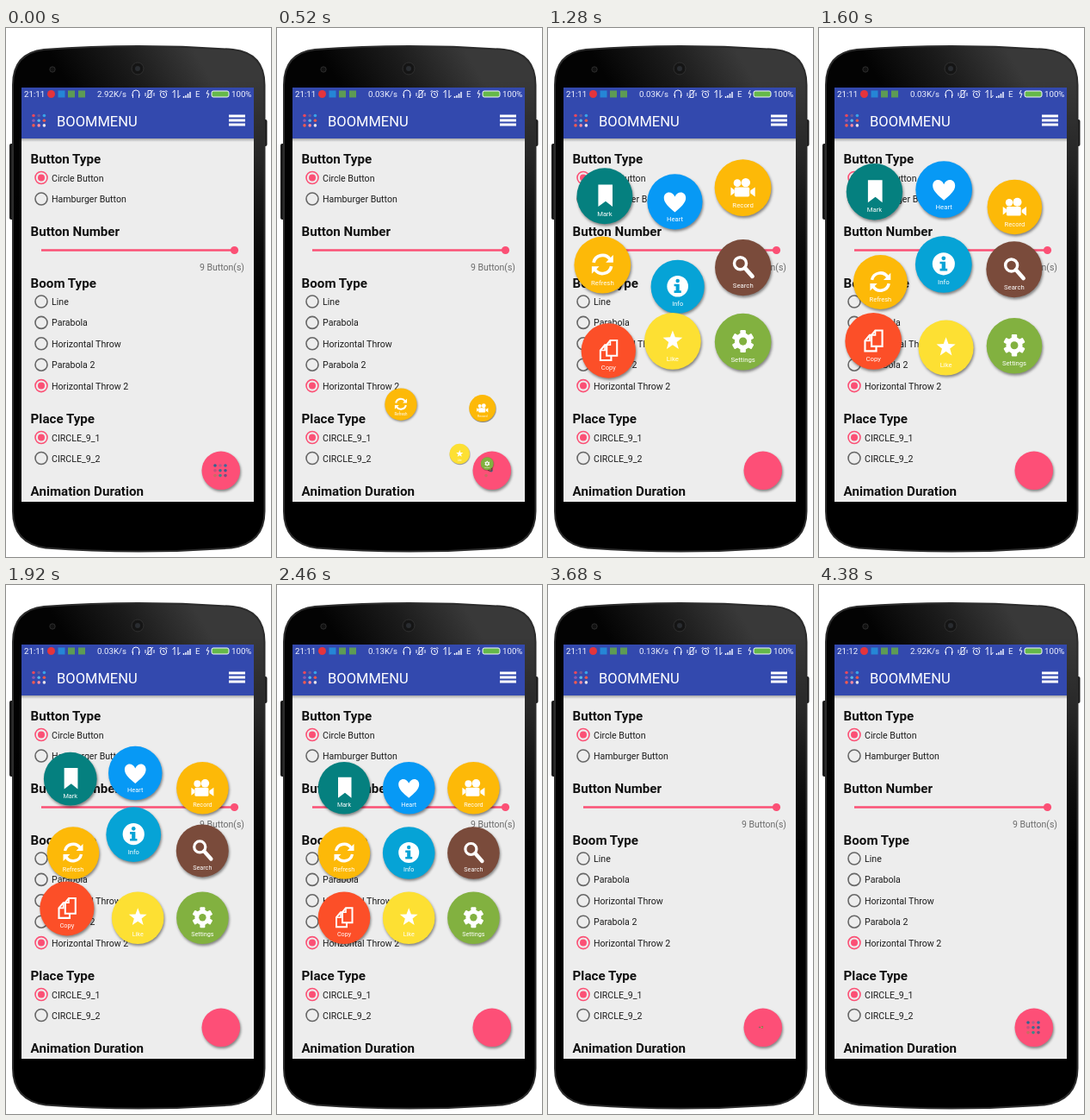
Animation, 308 px wide and 613 px high, one loop 4460 ms. Source, as an HTML page:

```html
<!DOCTYPE html>
<html lang="en">
<head>
<meta charset="utf-8">
<title>Boom menu</title>
<style>
  html, body { margin: 0; width: 100%; height: 100%; overflow: hidden; background: #fff; }
  svg { display: block; width: 308px; height: 613px; font-family: Roboto, sans-serif; }
  .head { font-size: 15.15px; font-weight: 700; fill: #111; }
  .item { font-size: 10.6px; fill: #1c1c1c; }
  .status { font-size: 9.7px; fill: #f2f4ff; }
  .label { font-size: 7.2px; fill: #fff; text-anchor: middle; }
  .raised { filter: drop-shadow(1px 2px 1.5px rgba(0, 0, 0, .45)); }
  .line { fill: none; stroke: #f2f4ff; stroke-width: 1; }
</style>
</head>
<body>
<svg viewBox="0 0 308 613">
  <defs>
    <linearGradient id="face" gradientUnits="userSpaceOnUse" x1="90" y1="95" x2="215" y2="20">
      <stop offset="0" stop-color="#030303"/><stop offset=".5" stop-color="#1b1b1b"/>
      <stop offset="1" stop-color="#393939"/>
    </linearGradient>
    <linearGradient id="fall" gradientUnits="userSpaceOnUse" x1="0" y1="60" x2="0" y2="330">
      <stop offset="0" stop-opacity="0"/><stop offset="1"/>
    </linearGradient>
    <linearGradient id="shade" x2="0" y2="1">
      <stop offset="0" stop-opacity=".3"/><stop offset="1" stop-opacity="0"/>
    </linearGradient>
    <path id="body" d="M8 66Q8 29 44 25Q154 17 264 25Q300.500 29 300.500 66V560Q300.500 597 262 602.500Q154 610.500 46 602.500Q8 597 8 560Z"/>
  </defs>

  <rect x="4" y="134" width="6" height="88" rx="2" fill="#1a1a1a"/>
  <rect x="298" y="106" width="5.500" height="31" rx="2" fill="#1a1a1a"/>
  <use href="#body" fill="url(#face)"/>
  <use href="#body" fill="url(#fall)" stroke="#2c2c2c" stroke-width="2"/>
  <circle cx="153" cy="47" r="7" fill="#151515" stroke="#303030"/>
  <circle cx="153" cy="47" r="3" fill="#292c30"/>
  <circle cx="54" cy="48" r="3.2" fill="#111" stroke="#3b3b3b" stroke-width=".7"/>

  <rect x="18" y="69" width="270" height="480" fill="#ededed"/>
  <rect x="18" y="128" width="270" height="4" fill="url(#shade)"/>
  <rect x="18" y="69" width="270" height="59" fill="#3349ae"/>

  <g class="status">
    <text id="clock" x="21" y="80"></text>
    <text id="speed" x="140" y="80" text-anchor="end"></text>
    <text x="220" y="80">E</text>
    <text x="262" y="80">100%</text>
  </g>
  <circle cx="52.500" cy="76.500" r="4.500" fill="#e5343c"/>
  <rect x="60.500" y="72.500" width="8" height="8" fill="#2586d6"/>
  <rect x="72" y="72.500" width="8" height="8" fill="#5d9b55"/>
  <rect x="84" y="72.500" width="8" height="8" fill="#5d9b55"/>
  <g class="line">
    <path d="M147 79v-3a4 4 0 0 1 8 0v3M147.500 77v4M154.500 77v4"/>
    <path d="M165 72.500h4v8h-4zM162 75v4M172 75v4M163 81l8-9"/>
    <circle cx="183" cy="77" r="3.700"/><path d="M183 75v2l1.500 1M178.500 74l2-2M187.500 74l-2-2"/>
    <path d="M196 81v-9l-2.500 3M200 72v9l2.500-3"/>
    <path d="M206.500 81v-2M209 81v-3M211.500 81v-5M214 81v-7" stroke-width="1.500"/>
    <path d="M235 72l-2 4h3l-2 5"/>
    <rect x="239" y="73" width="20" height="7" rx="2" fill="#65b84a"/>
  </g>

  <g id="logo"></g>
  <text x="59" y="114" font-size="16.500" fill="#fff">BOOMMENU</text>
  <path d="M259 102h19M259 107h19M259 112h19" stroke="#fff" stroke-width="3"/>

  <g id="form"></g>
  <path d="M41 257.500H265" stroke="#fb5075" stroke-width="2.500"/>
  <circle cx="265.500" cy="257.500" r="4.600" fill="#fb5075"/>
  <text x="277" y="281" font-size="10.500" fill="#6b6b6b" text-anchor="end">9 Button(s)</text>

  <circle class="raised" cx="249.800" cy="512.800" r="22.300" fill="#fd4f77"/>
  <g id="dots"></g>
  <g id="menu"></g>
</svg>
<script>
const LOOP = 4460, OPEN_TIME = 1450, CLOSE_TIME = 1400, STAGGER = 47.5;
const OPEN_AT = 304, CLOSE_AT = 2530;
const HOME = { x: 249.5, y: 512.5 };
const PINK = '#fb5075';
const byId = id => document.getElementById(id);

function add(parent, tag, attrs, content = '') {
  const node = document.createElementNS('http://www.w3.org/2000/svg', tag);
  for (const key in attrs) node.setAttribute(key, attrs[key]);
  node.innerHTML = content;
  return parent.appendChild(node);
}

function bezier(x1, y1, x2, y2) {
  const curve = (a, b, s) => 3 * (1 - s) ** 2 * s * a + 3 * (1 - s) * s * s * b + s ** 3;
  return u => {
    if (u <= 0) return 0;
    if (u >= 1) return 1;
    let low = 0, high = 1;
    for (let i = 0; i < 24; i++) {
      const mid = (low + high) / 2;
      if (curve(x1, x2, mid) < u) low = mid; else high = mid;
    }
    return curve(y1, y2, low);
  };
}
const outBack = bezier(.175, .885, .32, 1.275);
const outCirc = bezier(.075, .82, .165, 1);

// Static form
const form = byId('form');
const heading = (y, text) => add(form, 'text', { class: 'head', x: 28.6, y }, text);
function radio(y, text, checked) {
  add(form, 'circle', { cx: 41, cy: y, r: 7, fill: 'none', 'stroke-width': 1.6, stroke: checked ? PINK : '#666' });
  if (checked) add(form, 'circle', { cx: 41, cy: y, r: 4, fill: PINK });
  add(form, 'text', { class: 'item', x: 53, y: y + 4 }, text);
}
heading(157, 'Button Type');
radio(173.5, 'Circle Button', true);
radio(198, 'Hamburger Button');
heading(241, 'Button Number');
heading(301, 'Boom Type');
['Line', 'Parabola', 'Horizontal Throw', 'Parabola 2', 'Horizontal Throw 2']
  .forEach((name, i) => radio(317 + i * 24.4, name, i === 4));
heading(458, 'Place Type');
radio(474.5, 'CIRCLE_9_1', true);
radio(498.5, 'CIRCLE_9_2');
heading(542, 'Animation Duration');

// Icons are centred on the origin of a button with radius 30
const gear = Array.from({ length: 6 }, (_, i) =>
  `<rect x="-3" y="-12" width="6" height="6" rx="1" transform="rotate(${i * 60})"/>`).join('');
const star = Array.from({ length: 10 }, (_, i) => {
  const r = i % 2 ? 4.6 : 11, a = i * Math.PI / 5;
  return `${r * Math.sin(a)},${-r * Math.cos(a)}`;
}).join(' ');
const icons = {
  mark: '<path d="M-7-12H8.500V12L1 6-7 12Z"/>',
  heart: '<path d="M0 12C-6 7-12 2-12-3.500C-12-11-3-12 0-5C3-12 12-11 12-3.500C12 2 6 7 0 12Z"/>',
  record: '<circle cx="-6" cy="-4.500" r="4"/><circle cx="3" cy="-5" r="4.800"/>' +
    '<rect x="-9" y="0" width="16" height="10" rx="1.500"/><path d="M8 3.500L13 0V10L8 6.500ZM-13 0L-9 3V6L-13 9Z"/>',
  refresh: '<path d="M-9.500-2A9.700 9.700 0 0 1 8-5.500M9.500 2A9.700 9.700 0 0 1-8 5.500" fill="none" stroke="#fff" stroke-width="3.400"/>' +
    '<path d="M11.500-10V-2H3.500ZM-11.500 10V2H-3.500Z"/>',
  info: color => `<circle r="12"/><g fill="${color}"><circle cy="-6" r="2.200"/><path d="M-4-2.500H2V5H4V7.500H-4V5H-2V0H-4Z"/></g>`,
  search: '<circle cx="-3" cy="-4" r="6.500" fill="none" stroke="#fff" stroke-width="3.200"/><path d="M2 1L10 10" stroke="#fff" stroke-width="4.400" stroke-linecap="round"/>',
  copy: color => `<g fill="${color}" stroke="#fff" stroke-width="2"><path d="M-4-6H3V11H-9V0Z"/><path d="M2-11H9.500V6H-2V-6Z"/></g>` +
    '<path d="M-9 0H-4V-6M-2-6H2V-11" fill="none" stroke="#fff" stroke-width="1.600"/>',
  like: `<polygon points="${star}"/>`,
  settings: color => `<circle r="9"/>${gear}<circle r="4.200" fill="${color}"/>`
};

// name, colour, opening turn, closing turn
const buttons = [
  ['Mark', '#05807f', 5, 6],
  ['Heart', '#0799f5', 6, 0],
  ['Record', '#fdb908', 1, 1],
  ['Refresh', '#fdb908', 0, 5],
  ['Info', '#06a3d6', 8, 2],
  ['Search', '#7a4b3b', 4, 7],
  ['Copy', '#fc4f28', 7, 3],
  ['Like', '#fde033', 2, 4],
  ['Settings', '#82b140', 3, 8]
].map(([name, color, openTurn, closeTurn], i) => {
  const art = icons[name.toLowerCase()];
  const icon = typeof art === 'function' ? art(color) : art;
  const col = i % 3, row = Math.floor(i / 3);
  return {
    x: 78 + col * 75.2, y: 235.3 + row * 75.2,
    opens: OPEN_AT + openTurn * STAGGER,
    closes: CLOSE_AT + closeTurn * STAGGER,
    node: add(byId('menu'), 'g', { fill: '#fff' },
      `<circle class="raised" r="30.300" fill="${color}"/><g transform="translate(0 -.5)">${icon}</g><text class="label" y="21.500">${name}</text>`),
    dot: null, col, row
  };
});

const dotColors = ['#e8495c', '#6a5a9c', '#39a4e8', '#8c5ab0', '#58b7e8', '#e85a4c', '#f05a50', '#f48aa0', '#e8e4ea'];
const fabColors = ['#2f668f', '#b85c86', '#396b9c', '#c64f7c', '#39708e', '#49588c', '#c96c63', '#3f8b86', '#765080'];
buttons.forEach((b, i) => {
  add(byId('logo'), 'circle', { cx: 32 + b.col * 6.2, cy: 101.5 + b.row * 5.7, r: 1.8, fill: dotColors[i] });
  b.dot = add(byId('dots'), 'circle', { cx: 243 + b.col * 6, cy: 507 + b.row * 5.8, r: 1.8, fill: fabColors[i] });
});

function render(t) {
  for (const b of buttons) {
    const p = t < b.closes
      ? outBack((t - b.opens) / OPEN_TIME)
      : 1 - outCirc((t - b.closes) / CLOSE_TIME);
    const away = t > b.opens && t < b.closes + CLOSE_TIME;
    const x = HOME.x + (b.x - HOME.x) * p;
    const y = HOME.y + (b.y - HOME.y) * p * p;
    b.node.setAttribute('transform', `translate(${x} ${y}) scale(${p})`);
    b.node.setAttribute('visibility', away && p > .001 ? 'visible' : 'hidden');
    b.dot.setAttribute('visibility', away ? 'hidden' : 'visible');
  }
  byId('clock').textContent = t < 4080 ? '21:11' : '21:12';
  byId('speed').textContent = (t < 460 || t >= 4080 ? '2.92' : t < 2460 ? '0.03' : '0.13') + 'K/s';
}

const start = performance.now();
function tick() {
  render((performance.now() - start) % LOOP);
  requestAnimationFrame(tick);
}
tick();
</script>
</body>
</html>
```
